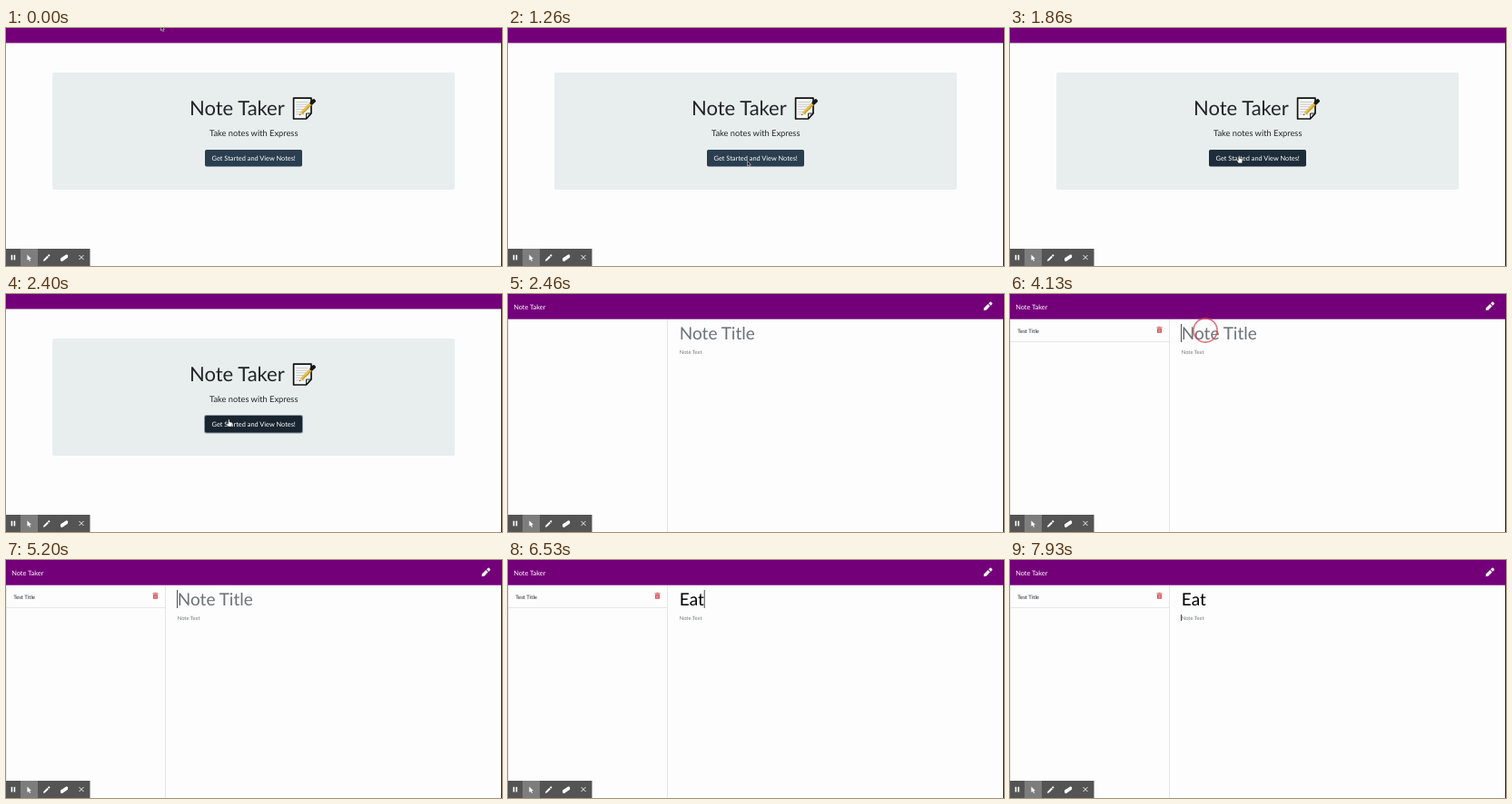
An HTML page with a canvas that plays this animation: 546x262 px, repeating every 8 s.

```html
<!DOCTYPE html>
<html lang="en">
<head>
<meta charset="utf-8">
<title>Note Taker</title>
<style>
  html, body { margin: 0; width: 100%; height: 100%; overflow: hidden; background: #fdfdfd; }
  canvas { display: block; width: 546px; height: 262px; }
</style>
</head>
<body>
<canvas id="stage"></canvas>
<script>
const W = 546, H = 262, LOOP = 8000;
const PURPLE = '#730078', PAGE = '#fdfdfd', INK = '#212529';
const canvas = document.getElementById('stage');
const ctx = canvas.getContext('2d');
const dpr = window.devicePixelRatio || 1;
canvas.width = W * dpr;
canvas.height = H * dpr;

const OPEN_NOTES = 2460, LIST_READY = 2530, FOCUS = 4000, TAB = 7660;
const keys = [[5660, 'E'], [5860, 'Ea'], [6130, 'Eat']];

// Pointer tip: time, x, y
const path = [
  [0, 170.5, -2.5], [60, 171, 1], [400, 222, 138], [800, 222, 138],
  [1000, 238, 163], [1260, 263.5, 146.5], [1600, 263, 146],
  [1930, 251, 140], [2200, 245.5, 138], [2460, 245.5, 138]
];

function rect(x, y, w, h, fill) {
  ctx.fillStyle = fill;
  ctx.fillRect(x, y, w, h);
}

function round(x, y, w, h, r, fill) {
  ctx.beginPath();
  ctx.roundRect(x, y, w, h, r);
  ctx.fillStyle = fill;
  ctx.fill();
}

function poly(points, fill, stroke, width = 1) {
  ctx.beginPath();
  points.forEach(([x, y], i) => i ? ctx.lineTo(x, y) : ctx.moveTo(x, y));
  if (fill) {
    ctx.closePath();
    ctx.fillStyle = fill;
    ctx.fill();
  }
  if (stroke) {
    ctx.strokeStyle = stroke;
    ctx.lineWidth = width;
    ctx.stroke();
  }
}

function text(str, x, y, size, fill, align = 'left') {
  ctx.font = `400 ${size}px Lato, sans-serif`;
  ctx.textAlign = align;
  ctx.fillStyle = fill;
  ctx.fillText(str, x, y);
}

function at(x, y, angle, draw) {
  ctx.save();
  ctx.translate(x, y);
  ctx.rotate(angle);
  draw();
  ctx.restore();
}

// Pencil pointing left before rotation
function pencil(x, y, len, thick) {
  at(x, y, -Math.PI / 4, () => {
    const l = len / 2, h = thick / 2;
    poly([[-l, 0], [-l + h * 1.4, -h], [l - thick * 1.2, -h], [l - thick * 1.2, h], [-l + h * 1.4, h]], '#fff');
    round(l - thick * 0.9, -h, thick * 0.9, thick, [0, h / 2, h / 2, 0], '#fff');
  });
}

function memo() {
  ctx.lineJoin = 'round';
  poly([[316.6, 77.2], [336, 77.2], [336, 94], [330.5, 100], [316.6, 100]], '#f7f8f5');
  for (let i = 0; i < 6; i++) {
    rect(319.2, 81 + i * 2.7, i < 4 ? 13.5 : 9, 0.8, '#b9bfc0');
  }
  poly([[336, 94], [330.5, 94], [330.5, 100]], '#d5dad9', '#111', 0.9);
  ctx.beginPath();
  ctx.moveTo(336, 77.2);
  ctx.lineTo(316.6, 77.2);
  ctx.lineTo(316.6, 100);
  ctx.lineTo(330.5, 100);
  ctx.lineTo(336, 94);
  ctx.closePath();
  ctx.strokeStyle = '#111';
  ctx.lineWidth = 1.7;
  ctx.stroke();
  at(331, 88, -Math.PI / 4, () => {
    poly([[-11.5, 0], [-8, -1.7], [-8, 1.7]], '#e8cfa4');
    rect(-8, -1.7, 15, 3.4, '#e9c14b');
    rect(-8, 0.4, 15, 1.3, '#c99a2c');
    poly([[-11.5, 0], [-10.2, -0.7], [-10.2, 0.7]], '#222');
    round(6, -2.1, 7, 4.2, 1.6, '#161616');
  });
}

function home(t) {
  rect(0, 0, W, 16.5, PURPLE);
  round(51, 49, 443, 129, 2, '#e8eeee');
  text('Note Taker', 202, 96, 22, INK);
  memo();
  text('Take notes with Express', 272.7, 119, 9.3, INK, 'center');
  const pressed = t >= 2300;
  if (pressed) round(218, 133, 109, 20.5, 2.5, '#8b979f');
  round(219, 134, 107, 18.5, 1.7, pressed ? '#182530' : t >= 1660 ? '#1e2d3a' : '#2b3e50');
  text('Get Started and View Notes!', 272.7, 145.7, 7.4, '#fff', 'center');
}

function trash(x, y) {
  const red = '#d6525b';
  rect(x, y + 0.6, 6, 1, red);
  rect(x + 2, y, 2, 0.8, red);
  round(x + 0.5, y + 2, 5, 5, 0.6, red);
  for (let i = 0; i < 3; i++) rect(x + 1.5 + i * 1.25, y + 2.9, 0.45, 3.2, '#f3c3c6');
}

function typed(t) {
  return keys.reduce((s, [time, value]) => t >= time ? value : s, '');
}

function caretOn(t) {
  const resets = [FOCUS + 130, ...keys.map(k => k[0]), TAB];
  const last = resets.filter(r => r <= t).pop() ?? t;
  return t >= FOCUS && Math.floor((t - last) / 500) % 2 === 0;
}

function ring(t) {
  const p = (t - FOCUS) / 330;
  if (p < 0 || p >= 1) return;
  ctx.beginPath();
  ctx.arc(215, 40, 4 + 14.3 * (1 - (1 - p) ** 2), 0, Math.PI * 2);
  ctx.strokeStyle = `rgba(210, 70, 82, ${0.9 * (1 - p * p)})`;
  ctx.lineWidth = 1.6;
  ctx.stroke();
}

function notes(t) {
  rect(0, 0, W, 27.7, PURPLE);
  text('Note Taker', 6.2, 16.7, 7.4, '#fff');
  pencil(528, 13.7, 12.5, 3.4);
  rect(0, 28, 0.6, H - 28, '#dcdde0');
  rect(175, 28, 0.8, H - 28, '#dedfe2');
  if (t >= LIST_READY) {
    text('Test Title', 8.2, 42.8, 6, INK);
    trash(161.5, 35.8);
    rect(0, 52.3, 175, 0.7, '#dedfe2');
  }
  const title = typed(t);
  text(title || 'Note Title', 188.8, 50, 19, title ? '#000' : '#6d7275');
  const titleEnd = title ? 188.8 + ctx.measureText(title).width : 188.2;
  text('Note Text', 188.8, 65.9, 5.8, '#74797c');
  if (caretOn(t)) {
    if (t < TAB) rect(titleEnd, 33, 0.8, 20, '#222');
    else rect(188.2, 60, 0.8, 7, '#222');
  }
  ring(t);
}

function arrow(x, y, s, fill, edge) {
  at(x, y, 0, () => {
    ctx.scale(s, s);
    ctx.lineJoin = 'round';
    poly([[0, 0], [0, 5.4], [1.3, 4.3], [2.2, 6.3], [3.1, 5.9], [2.3, 4], [3.9, 3.9]], fill);
    if (edge) {
      ctx.closePath();
      ctx.strokeStyle = edge;
      ctx.lineWidth = 0.5;
      ctx.stroke();
    }
  });
}

function hand(x, y) {
  at(x, y, 0, () => {
    ctx.lineJoin = 'round';
    poly([[-0.7, 0], [0.5, 0], [0.6, 2.8], [3.2, 3.4], [3.6, 4.4], [3, 8], [-0.8, 8], [-2.5, 5.2], [-2.1, 4.4], [-0.8, 5.2]], '#fff');
    ctx.strokeStyle = '#222';
    ctx.lineWidth = 0.4;
    ctx.stroke();
  });
}

function pointer(t) {
  const i = path.findIndex(k => k[0] > t);
  const [t0, x0, y0] = path[i - 1], [t1, x1, y1] = path[i];
  const p = (t - t0) / (t1 - t0), e = p * p * (3 - 2 * p);
  const x = x0 + (x1 - x0) * e, y = y0 + (y1 - y0) * e;
  if (t >= 1660) hand(x, y);
  else arrow(x, y, 1, '#151515', '#fff');
}

function toolbar() {
  rect(0, 243, 92.5, 19, '#545454');
  rect(16, 243, 19, 19, '#7d7d7d');
  rect(5.6, 249.8, 1.6, 5.6, '#fff');
  rect(8.6, 249.8, 1.6, 5.6, '#fff');
  arrow(23.4, 249.5, 1.15, '#fff');
  pencil(44.5, 253.2, 9.8, 2.1);
  poly([[60, 253.4], [66.5, 249.3], [68.2, 250], [68, 252.8], [61.8, 257], [60, 256.2]], '#fff');
  poly([[80.5, 250], [85.5, 255]], null, '#fff', 0.9);
  poly([[85.5, 250], [80.5, 255]], null, '#fff', 0.9);
}

function render(t) {
  ctx.setTransform(dpr, 0, 0, dpr, 0, 0);
  ctx.textRendering = 'geometricPrecision';
  rect(0, 0, W, H, PAGE);
  if (t < OPEN_NOTES) {
    home(t);
    pointer(t);
  } else {
    notes(t);
  }
  toolbar();
  rect(545, 0, 1, H, '#2b2b2b');
}

const start = performance.now();
function tick() {
  render((performance.now() - start) % LOOP);
  requestAnimationFrame(tick);
}
tick();
</script>
</body>
</html>
```
